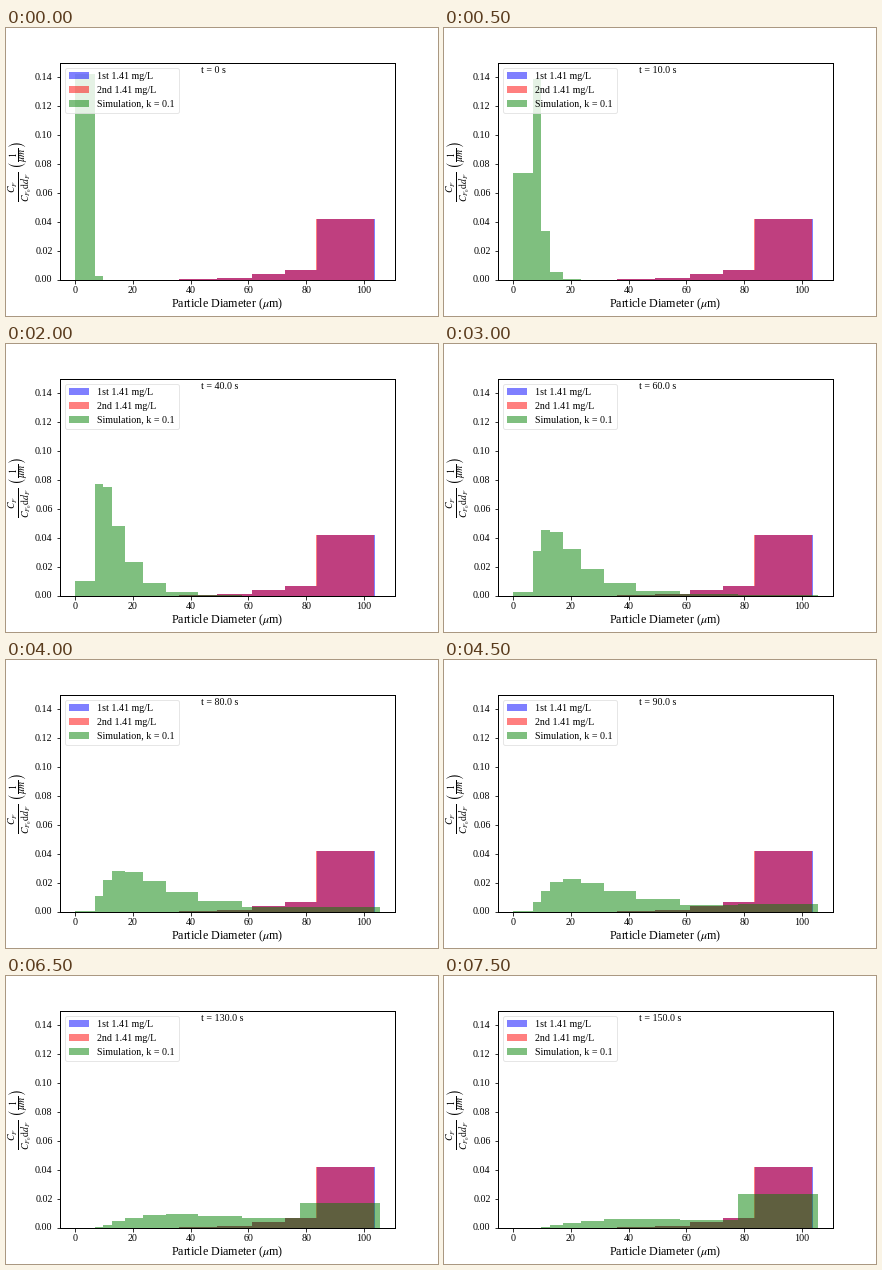
Write a matplotlib script that moves like this. It is 432 by 288 pixels and loops after 8000 ms.

```python
import math

import matplotlib.pyplot as plt
import numpy as np
from matplotlib.animation import FuncAnimation

plt.rcParams.update({
    "font.family": "Liberation Serif",
    "font.size": 10,
    "mathtext.fontset": "stix",
    "axes.linewidth": 1,
    "xtick.major.pad": 2.5,
    "ytick.major.pad": 4,
    "ytick.alignment": "center",
})

BINS = 10
FRAMES = 16
STEP = 10          # simulated seconds per frame
RATE = 0.0655      # doublings per second
SEED = 0.006       # mass already in the second bin at t = 0

# Diameter grows with fractal dimension 2.3 at each doubling
edges = np.concatenate([[0], 7 * 2 ** (np.arange(BINS) / 2.3)])
widths = np.diff(edges)


def poisson(lam):
    p = [math.exp(-lam) * lam ** n / math.factorial(n) for n in range(BINS - 1)]
    return np.array(p + [1 - sum(p)])


def density(t):
    """Mass density per bin; the last bin collects everything larger."""
    p = poisson(RATE * t)
    shifted = np.concatenate([[0], p[:-1]])
    shifted[-1] += p[-1]
    return ((1 - SEED) * p + SEED * shifted) / widths


fig = plt.figure(figsize=(6, 4), dpi=72)
ax = fig.add_axes([0.125, 0.125, 0.775, 0.755])


def bars(x, heights, color, label):
    return ax.bar(x[:-1], heights, np.diff(x), align="edge",
                  color=color, alpha=0.5, label=label)


measured = [0.0004, 0.0014, 0.0040, 0.0069, 0.0420]
inner = [35.94, 49.09, 61.23, 72.64]
bars(inner + [83.75, 103.82], measured, "blue", "1st 1.41 mg/L")
bars(inner + [83.4, 103.48], measured, "red", "2nd 1.41 mg/L")
sim = bars(edges, density(0), "green", "Simulation, k = 0.1")

margin = 0.05 * edges[-1]
ax.set_xlim(-margin, edges[-1] + margin)
ax.set_ylim(0, 0.15)
ax.set_xticks(range(0, 101, 20))
ax.set_yticks(np.arange(8) * 0.02)
ax.set_xlabel(r"Particle Diameter ($\mu$m)", fontsize=12, labelpad=2)
ax.set_ylabel(r"$\frac{C_F}{C_{F_0}\mathrm{d}d_F}$ $\left(\frac{1}{\mu m}\right)$",
              fontsize=14, labelpad=0)
ax.legend(loc="upper left", edgecolor="0.88")
clock = ax.text(0.42, 0.95, "", transform=ax.transAxes)


def update(i):
    t = i * STEP
    for bar, h in zip(sim, density(t)):
        bar.set_height(h)
    clock.set_text(f"t = {t:.1f} s" if t else "t = 0 s")
    return [*sim, clock]


anim = FuncAnimation(fig, update, frames=FRAMES, interval=500,
                     repeat=True, repeat_delay=0)
plt.show()
```
